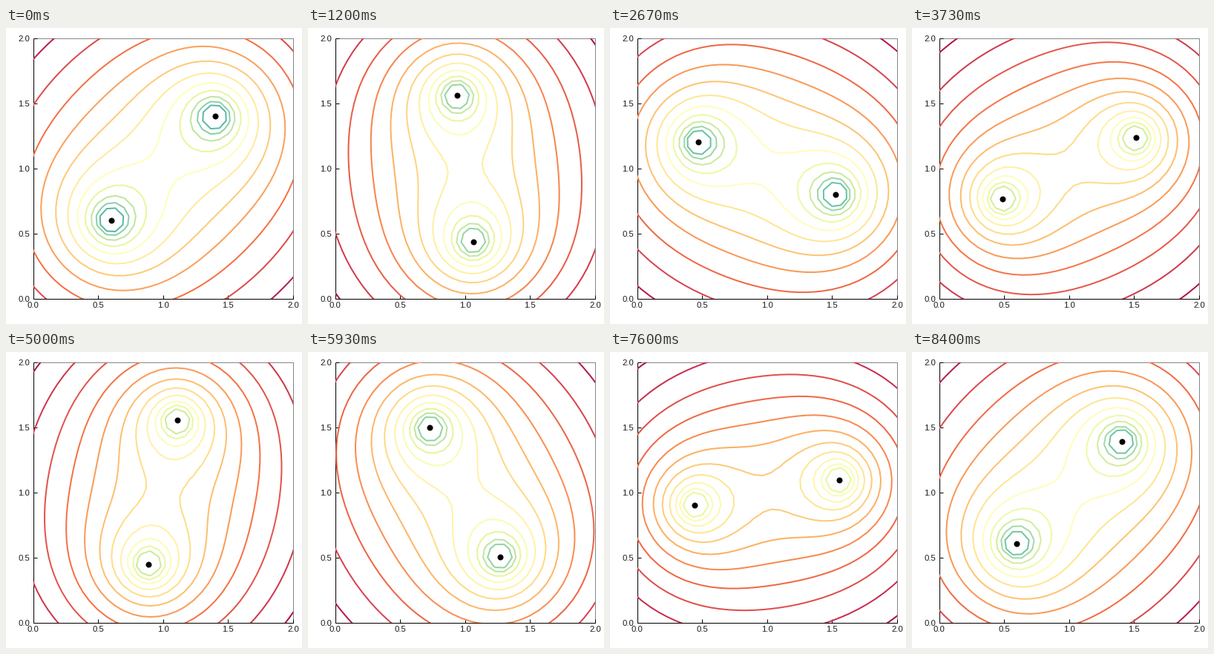
Write a matplotlib script that moves like this. It is 399x400 px and loops after 8470 ms.

```python
import numpy as np
import matplotlib.pyplot as plt
from matplotlib.animation import FuncAnimation

W, H, DPI = 399, 400, 100
POSES, LOOP = 127, 8470
SUB = 2                             # ticks per pose
PX = 72 / DPI                       # one pixel in points

SIDE, CELLS = 2.0, 30
STEP = SIDE / CELLS
CENTRE, RADIUS = 1.0, 0.4 * np.sqrt(2)
START = np.radians(45)
DT = 0.2
SPIN = 1 / (np.pi * (2 * RADIUS) ** 2)   # rate of a pair of unit vortices
LEVELS = 0.702 - 0.2975 * np.arange(10, -1, -1)

# cell centres plus one ghost cell on each side
nodes = (np.arange(-1, CELLS + 1) + 0.5) * STEP
X, Y = np.meshgrid(nodes, nodes)

plt.rcParams["font.family"] = "Liberation Sans"
fig = plt.figure(figsize=(W / DPI, H / DPI), dpi=DPI, facecolor="white")
left, right, top, bottom = 36.5, 387, 14, 365.5
ax = fig.add_axes([left / W, 1 - bottom / H, (right - left) / W, (bottom - top) / H])


def setup_axes():
    ax.set(xlim=(0, SIDE), ylim=(0, SIDE))
    ticks = np.arange(0, SIDE + 0.1, 0.5)
    labels = [f"{t:.1f}" for t in ticks]
    ax.set_xticks(ticks, labels)
    ax.set_yticks(ticks, labels)
    ax.tick_params(direction="in", length=5 * PX, width=PX,
                   labelsize=11.2 * PX, labelcolor="#1a1a1a")
    ax.tick_params(axis="x", pad=4 * PX)
    ax.tick_params(axis="y", pad=4.5 * PX)
    for side, spine in ax.spines.items():
        spine.set_linewidth(PX)
        spine.set_color("black" if side in ("left", "bottom") else "#858585")
        spine.set_zorder(1)


def vortices(pose):
    angle = START + SPIN * DT * pose
    offset = RADIUS * np.array([np.cos(angle), np.sin(angle)])
    return CENTRE + np.array([offset, -offset])


def stream(points):
    return sum(np.log(np.hypot(X - x, Y - y)) for x, y in points)


setup_axes()
dots, = ax.plot([], [], "o", color="black", ms=8 * PX, mew=0, zorder=5)
lines = []


def update(tick):
    # round to the nearest pose, so each one is in place when its time comes
    pose = (tick + SUB // 2) // SUB % POSES
    while lines:
        lines.pop().remove()
    points = vortices(pose)
    z = stream(points)
    lines.append(ax.contour(X, Y, z, levels=LEVELS, cmap="Spectral_r",
                            vmin=z.min(), vmax=z.max(), linestyles="solid",
                            linewidths=2 * PX, zorder=3))
    ax.set(xlim=(0, SIDE), ylim=(0, SIDE))
    dots.set_data(points[:, 0], points[:, 1])
    return [dots]


anim = FuncAnimation(fig, update, frames=POSES * SUB,
                     interval=LOOP / (POSES * SUB),
                     repeat=True, repeat_delay=0, blit=False)
plt.show()
```
